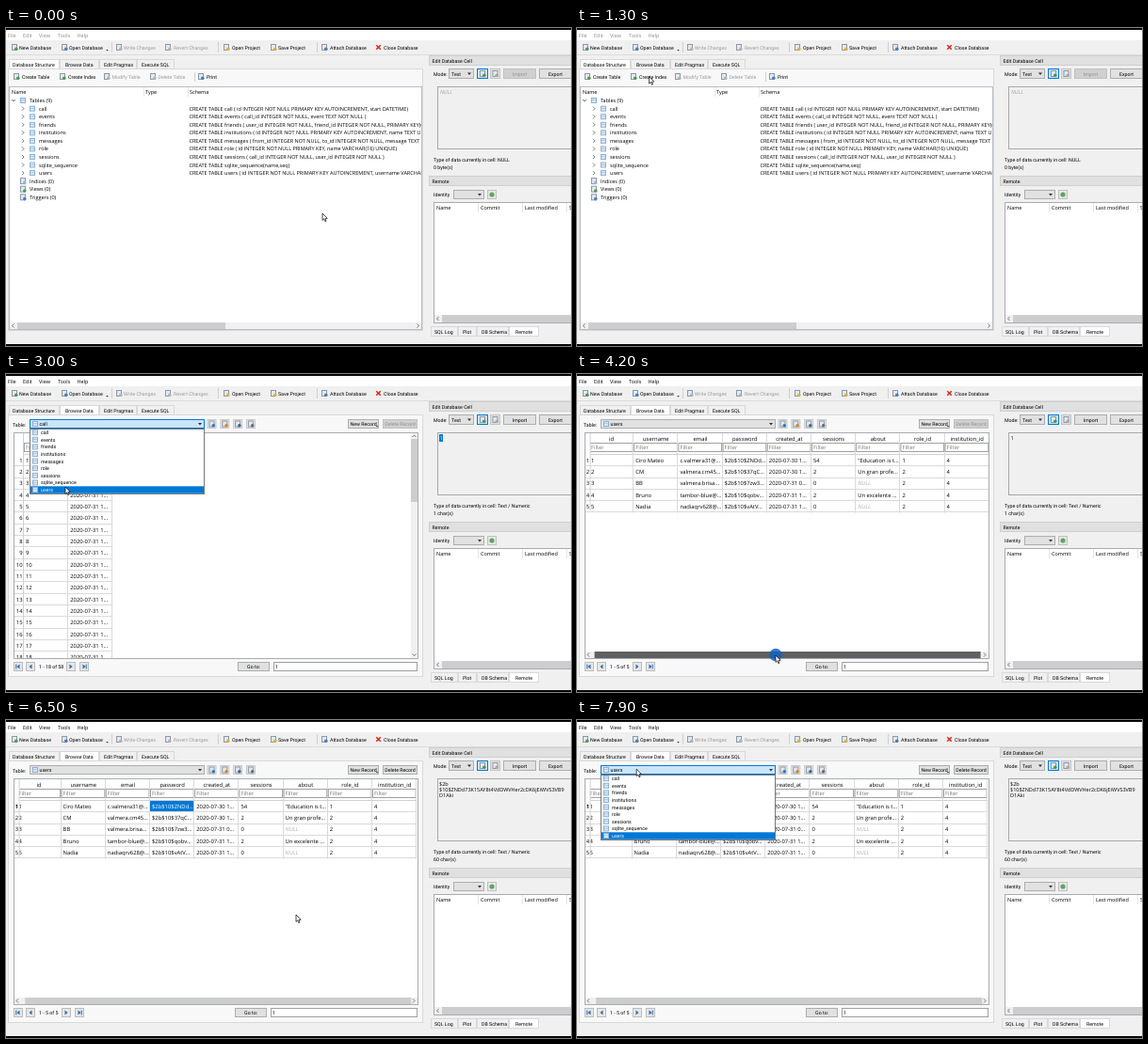
An HTML page with a canvas for the animation above (8000 ms loop, 600 by 338 pixels).

```html
<!DOCTYPE html>
<html lang="en">
<head>
<meta charset="utf-8">
<title>Database browser</title>
<style>
html, body { margin: 0; width: 100%; height: 100%; overflow: hidden; background: #000; }
canvas { display: block; width: 600px; height: 338px; }
</style>
</head>
<body>
<canvas></canvas>
<script>
const canvas = document.querySelector('canvas');
const ratio = window.devicePixelRatio || 1;
canvas.width = 600 * ratio;
canvas.height = 338 * ratio;
const ctx = canvas.getContext('2d');
const LOOP = 8000;
const UI = '5.25px Roboto, sans-serif';
const TREE = '5.5px "Open Sans", sans-serif';
const CELL = '5.85px "Open Sans", sans-serif';
const BLUE = '#0078d7', GRAY = '#9a9a9a', THUMB = '#cdcdcd';

// Moments of the session, in ms
const BROWSE = 1500, OPEN = 2400, USERS = 3300, DRAG = 4000, DROP = 4500, PICK = 5200, REOPEN = 7700;
const clicks = [BROWSE, OPEN, USERS, PICK, REOPEN];
const path = [
  [0, 336, 197], [100, 336, 197], [800, 68, 134], [1000, 69, 120], [1400, 78, 39], [1600, 78, 39],
  [2100, 73, 53], [2500, 72, 54], [3000, 63, 120], [3400, 63, 122], [3900, 209, 299], [4000, 209, 299],
  [4400, 213, 299], [4600, 213, 299], [5100, 180, 92], [5400, 180, 92], [6200, 308, 207],
  [6900, 308, 207], [7600, 64, 53], [8000, 63, 52]
];

const tables = ['call', 'events', 'friends', 'institutions', 'messages', 'role', 'sessions', 'sqlite_sequence', 'users'];
const ID = ' ( id INTEGER NOT NULL PRIMARY KEY';
const schemas = [
  ID + ' AUTOINCREMENT, start DATETIME)',
  ' ( call_id INTEGER NOT NULL, event TEXT NOT NULL )',
  ' ( user_id INTEGER NOT NULL, friend_id INTEGER NOT NULL, PRIMARY KEY(user_id, friend_id) )',
  ID + ' AUTOINCREMENT, name TEXT UNIQUE )',
  ' ( from_id INTEGER NOT NULL, to_id INTEGER NOT NULL, message TEXT )',
  ID + ', name VARCHAR(16) UNIQUE)',
  ' ( call_id INTEGER NOT NULL, user_id INTEGER NOT NULL )',
  '(name,seq)',
  ID + ' AUTOINCREMENT, username VARCHAR(32) )'
];
const callRows = Array.from({ length: 18 }, (_, i) => [i + 1, `2020-07-31 ${i ? 1 : 0}...`]);
const userColumns = ['id', 'username', 'email', 'password', 'created_at', 'sessions', 'about', 'role_id', 'institution_id'];
const userRows = [
  [1, 'Ciro Mateo', 'c.valmera31@...', '$2b$10$ZNDd...', '2020-07-30 1...', 54, '"Education is t...', 1, 4],
  [2, 'CM', 'valmera.cm45...', '$2b$10$37qC...', '2020-07-30 1...', 2, 'Un gran profe...', 2, 4],
  [3, 'BB', 'valmera.brisa...', '$2b$10$7zw3...', '2020-07-31 0...', 0, 'NULL', 2, 4],
  [4, 'Bruno', 'tambor-blue@...', '$2b$10$qobv...', '2020-07-31 1...', 2, 'Un excelente ...', 2, 4],
  [5, 'Nadia', 'nadiaqrv628@...', '$2b$10$vAtV...', '2020-07-31 1...', 0, 'NULL', 2, 4]
];
const hash = ['$2b', '$10$ZNDd73K15AY8t4VdDWVHer2cDK6jEiWVS3VB9', 'D1Aki'];

function rect(x, y, w, h, color) {
  ctx.fillStyle = color;
  ctx.fillRect(x, y, w, h);
}

function box(x, y, w, h, fill, border = '#adadad') {
  rect(x, y, w, h, border);
  rect(x + 1, y + 1, w - 2, h - 2, fill);
}

function text(s, x, y, color = '#000', font = UI, align = 'left') {
  ctx.font = font;
  ctx.textAlign = align;
  ctx.fillStyle = color;
  ctx.fillText(s, x, y + 2);
}

function poly(x, y, points, fill, stroke, width = .8) {
  ctx.beginPath();
  points.forEach(([dx, dy]) => ctx.lineTo(x + dx, y + dy));
  if (fill) {
    ctx.closePath();
    ctx.fillStyle = fill;
    ctx.fill();
  }
  if (stroke) {
    ctx.strokeStyle = stroke;
    ctx.lineWidth = width;
    ctx.stroke();
  }
}

function disc(x, y, r, color) {
  ctx.beginPath();
  ctx.arc(x, y, r, 0, 7);
  ctx.fillStyle = color;
  ctx.fill();
}

function clip(x, y, w, h, draw) {
  ctx.save();
  ctx.beginPath();
  ctx.rect(x, y, w, h);
  ctx.clip();
  draw();
  ctx.restore();
}

// Chevron pointing right, turned by quarter turns
function chevron(x, y, turns = 0, color = '#555') {
  ctx.save();
  ctx.translate(x, y);
  ctx.rotate(turns * Math.PI / 2);
  poly(0, 0, [[-1, -2], [1, 0], [-1, 2]], null, color);
  ctx.restore();
}

function icon(x, y, accent, page = '#e4e9ef', border = '#8b98a6') {
  box(x - 3, y - 3.5, 6, 7, page, border);
  disc(x + 1.8, y + 1.8, 1.8, accent);
}

function tableIcon(x, y) {
  box(x - 3, y - 3, 6, 6, '#d9e9f8', '#8fb0d0');
  rect(x - 2, y - .5, 4, .6, '#8fb0d0');
}

function button(label, x, y, w, h, enabled = true) {
  box(x, y, w, h, enabled ? '#e1e1e1' : '#d0d0d0', enabled ? '#adadad' : '#c0c0c0');
  text(label, x + w / 2, y + h / 2, enabled ? '#000' : '#909090', UI, 'center');
}

function combo(x, y, w, h, label = '', hot = false) {
  box(x, y, w, h, hot ? '#cce4f7' : '#e1e1e1', hot ? BLUE : '#adadad');
  text(label, x + 3, y + h / 2);
  poly(x + w - 5, y + h / 2, [[-2, -1], [2, -1], [0, 1.5]], '#333');
}

function toolItem(label, iconX, textX, y, color, enabled = true) {
  icon(iconX, y, enabled ? color : '#b5b5b5');
  text(label, textX, y, enabled ? '#000' : GRAY);
}

function tabs(items, active, y, h) {
  items.forEach(([label, x, w, textX], i) => {
    box(x, y, w, h, i === active ? '#fff' : '#f0f0f0', '#d9d9d9');
    text(label, textX, y + h / 2);
  });
}

function frame(focused) {
  rect(0, 0, 600, 338, '#000');
  rect(0, 2, 600, 334, '#f0f0f0');
  rect(0, 2, 600, 11, '#fff');
  const menu = { File: 2, Edit: 18, View: 35, Tools: 55, Help: 75.5 };
  for (const name in menu) text(name, menu[name], 7.7, focused ? '#000' : '#8a8a8a', TREE);
  rect(0, 28, 600, 1, '#dcdcdc');
  toolItem('New Database', 9, 14, 20.5, '#4a9a50');
  toolItem('Open Database', 62, 67, 20.5, '#4a7fb8');
  poly(107.5, 23.5, [[-1.3, -.5], [1.3, -.5], [0, 1]], '#333');
  toolItem('Write Changes', 120, 125, 20.5, '', false);
  toolItem('Revert Changes', 172, 178, 20.5, '', false);
  toolItem('Open Project', 234, 240, 20.5, '#e2b13c');
  toolItem('Save Project', 284, 289, 20.5, '#e2b13c');
  toolItem('Attach Database', 338, 344, 20.5, '#4a7fb8');
  for (const x of [112, 225, 330]) rect(x, 15, 1, 11, '#cfcfcf');
  poly(395.5, 20.5, [[-2.3, -2.3], [2.3, 2.3]], null, '#d92c20', 1.6);
  poly(395.5, 20.5, [[-2.3, 2.3], [2.3, -2.3]], null, '#d92c20', 1.6);
  text('Close Database', 401, 20.5);
}

function structurePane(mouse) {
  toolItem('Create Table', 11, 17, 51.5, '#4a9a50');
  toolItem('Create Index', 60, 66, 51.5, '#4a9a50');
  toolItem('Modify Table', 107, 112.5, 51.5, '', false);
  toolItem('Delete Table', 156, 161.5, 51.5, '', false);
  rect(200, 47, 1, 10, '#d0d0d0');
  toolItem('Print', 207, 213, 51.5, '#4a7fb8');
  box(3, 62, 439, 259, '#fff', '#b8bcc2');
  text('Name', 6, 68, '#000', TREE);
  text('Type', 148, 68, '#000', TREE);
  text('Schema', 195, 68, '#000', TREE);
  rect(146, 63, 1, 10, '#e5e5e5');
  rect(193, 63, 1, 10, '#e5e5e5');
  const hover = Math.floor((mouse.y - 83.5) / 8.55);
  clip(4, 63, 437, 250, () => {
    chevron(8, 77, 1);
    tableIcon(18, 77);
    text('Tables (9)', 25, 77, '#000', TREE);
    tables.forEach((name, i) => {
      const y = 85.7 + i * 8.55;
      if (i === hover) rect(4, y - 4.2, 437, 8.5, '#e5f3ff');
      chevron(18, y);
      tableIcon(28, y);
      text(name, 35, y, '#000', TREE);
      text('CREATE TABLE ' + name + schemas[i], 194.5, y, '#000', TREE);
    });
    ['Indices', 'Views', 'Triggers'].forEach((name, i) => {
      const y = 162.6 + i * 8.6;
      icon(18, y, ['#9ab4cc', '#4a9a50', '#4a7fb8'][i]);
      text(name + ' (0)', 25, y, '#000', TREE);
    });
  });
  rect(4, 313, 437, 7, '#f0f0f0');
  rect(12, 313, 221, 7, THUMB);
  chevron(7.5, 316.5, 2);
  chevron(437.5, 316.5);
}

function grid(columns, rows, left, offset, picked, right) {
  const width = 47.2, pitch = 12.32, bottom = columns.length > 2 ? 294 : 302;
  const ruleEnd = Math.min(right, left + columns.length * width - offset);
  clip(9, 63, right - 9, bottom - 63, () => {
    rows.forEach((row, i) => {
      const y = 91.7 + i * pitch, bold = picked && i === 0 ? 'bold ' : '';
      text(i + 1, left - 1.5, y, '#000', bold + CELL, 'right');
      rect(9, Math.round(y + 5.5), ruleEnd - 9, 1, '#dadada');
    });
    rect(left - 1, 63, 1, 21 + rows.length * pitch, '#d0d0d0');
  });
  clip(left, 63, right - left, bottom - 63, () => {
    columns.forEach((name, c) => {
      const x = left + c * width - offset;
      text(name, x + width / 2, 69, '#000', CELL, 'center');
      box(x, 73, width - .5, 10, '#fff', '#a0a0a0');
      text('Filter', x + 2, 78, '#777', CELL);
      rect(Math.round(x + width) - 1, 63, 1, 23 + rows.length * pitch, '#dadada');
      rows.forEach((row, i) => {
        const y = 91.7 + i * pitch, chosen = picked && i === 0 && c === 3;
        const empty = row[c] === 'NULL';
        if (chosen) rect(x, 86, width - 1, 11, BLUE);
        text(row[c], x + 2, y, chosen ? '#fff' : empty ? '#b0b0b0' : '#000', (empty ? 'italic ' : '') + CELL);
      });
    });
    rect(left, 85, ruleEnd - left, 1, '#d0d0d0');
  });
}

function navButton(x, back, edge) {
  box(x - 5, 306, 10, 10, '#e6e6e6', '#bcbcbc');
  const d = back ? -1 : 1;
  poly(x, 311, [[-1.5 * d, -2.5], [1.5 * d, 0], [-1.5 * d, 2.5]], '#2c6cb0');
  if (edge) rect(x + 2.2 * d - .5, 308.5, 1, 5, '#2c6cb0');
}

function browsePane(t, mouse, open) {
  const users = t >= USERS, picked = t >= PICK;
  const hot = open || (mouse.y > 47 && mouse.y < 59 && mouse.x > 25 && mouse.x < 211);
  text('Table:', 7, 53.5);
  combo(25, 48, 186, 10, '', hot);
  tableIcon(31, 53);
  text(users ? 'users' : 'call', 35.5, 53.2);
  ['#2c7cc0', '#d9822b', '#38699a', '#607080'].forEach((color, i) => {
    box(213.5 + i * 13.8, 48, 10, 10, '#e8e8e8', '#c8c8c8');
    icon(218.5 + i * 13.8, 53, color);
  });
  button('New Record', 363, 48, 33, 10);
  poly(394, 55.5, [[-1.2, -.5], [1.2, -.5], [0, 1]], '#333');
  button('Delete Record', 400, 48, 37, 10, picked);

  box(8, 62, 430, 241, '#fff', '#a8acb2');
  if (users) {
    const offset = Math.min(1, Math.max(0, (t - DRAG) / 400)) * 3.2;
    grid(userColumns, userRows, 14.6, offset, picked, 437);
    rect(9, 295, 428, 7, '#f0f0f0');
    rect(17 + offset, 295, 410, 7, t >= DRAG && t < DROP ? '#606060' : THUMB);
    chevron(12, 298.5, 2);
    chevron(433, 298.5);
  } else {
    grid(['id', 'start'], callRows, 19, 0, false, 430);
    rect(430, 63, 7, 239, '#f0f0f0');
    rect(430, 69, 7, 67, THUMB);
    chevron(433.5, 66, 3);
    chevron(433.5, 298.5, 1);
  }
  const shift = users ? 5 : 0, go = users ? 243 : 246;
  navButton(13, true, true);
  navButton(26, true, false);
  text(users ? '1 - 5 of 5' : '1 - 18 of 58', 35, 311);
  navButton(69 - shift, false, false);
  navButton(83 - shift, false, true);
  button('Go to:', go, 306, 34, 10);
  box(go + 38, 306, 399 - go, 10, '#fff', '#a0a0a0');
  text('1', go + 40, 311);

  if (open) {
    box(25, 58, 186, 70, '#fff', '#777');
    const row = mouse.y > 58 ? Math.min(8, Math.floor((mouse.y - 58) / 7.65)) : users ? 8 : 0;
    tables.forEach((name, i) => {
      const y = 62.2 + i * 7.6;
      if (i === row) rect(26, y - 3.7, 184, 7.5, BLUE);
      tableIcon(31, y);
      text(name, 37, y, i === row ? '#fff' : '#000');
    });
  }
}

function dockTitle(label, y) {
  box(449, y, 152, 11, '#e0e0e0', '#cfcfcf');
  text(label, 452.5, y + 5.5);
}

function docks(t) {
  const loaded = t >= BROWSE, picked = t >= PICK;
  dockTitle('Edit Database Cell', 29);
  text('Mode:', 454, 48.5);
  combo(470, 43, 27, 11, 'Text');
  box(500, 43, 12, 11, '#cce4f7', BLUE);
  icon(506, 48.5, '#4a9a50');
  box(514, 43, 11, 11, '#e1e1e1', '#c4c4c4');
  icon(519.5, 48.5, '#aaa');
  button('Import', 528, 43, 35, 11, loaded);
  button('Export', 566, 43, 35, 11);
  box(458, 62, 143, 67, '#f0f0f0', '#a8a8a8');
  if (picked) hash.forEach((line, i) => text(line, 460, 68 + i * 6, '#000', TREE));
  else if (loaded) {
    if (t < USERS) rect(460, 64, 4, 8, BLUE);
    text('1', 460.5, 68, t < USERS ? '#fff' : '#000', TREE);
  } else text('NULL', 461, 68, '#a0a0a0', 'italic ' + TREE);
  text('Type of data currently in cell: ' + (loaded ? 'Text / Numeric' : 'NULL'), 454, 139.5);
  text(picked ? '60 char(s)' : loaded ? '1 char(s)' : '0 byte(s)', 454, 148.3);

  dockTitle('Remote', 157);
  text('Identity', 454, 177);
  combo(475, 172, 33, 10);
  box(511, 172, 10, 10, '#e8e8e8', '#c0c0c0');
  disc(516, 177, 2.6, '#5fa463');
  box(454, 185, 147, 129, '#fff', '#a8acb2');
  text('Name', 457, 191, '#000', TREE);
  text('Commit', 504, 191, '#000', TREE);
  text('Last modified', 551, 191, '#000', TREE);
  text('Size', 598, 191, '#000', TREE);
  for (const x of [501, 548, 595]) rect(x, 186, 1, 10, '#e5e5e5');
  rect(455, 305, 145, 8, '#f0f0f0');
  rect(463, 305, 137, 8, THUMB);
  chevron(458.5, 309, 2);
  tabs([['SQL Log', 451, 29, 455], ['Plot', 480, 20, 485], ['DB Schema', 500, 34, 505], ['Remote', 534, 32, 541]], 3, 317, 11);
}

function mouseAt(t) {
  const i = path.findIndex(p => p[0] > t);
  const [t0, x0, y0] = path[i - 1], [t1, x1, y1] = path[i];
  const u = (t - t0) / (t1 - t0), k = u * u * (3 - 2 * u);
  return { x: x0 + (x1 - x0) * k, y: y0 + (y1 - y0) * k };
}

function draw(t) {
  const mouse = mouseAt(t), browsing = t >= BROWSE;
  const open = (t >= OPEN && t < USERS) || t >= REOPEN;
  ctx.setTransform(ratio, 0, 0, ratio, 0, 0);
  ctx.textRendering = 'geometricPrecision';
  frame(browsing);
  box(2, 43, 441, 279, '#f8f8f8', '#d9d9d9');
  tabs([['Database Structure', 3, 54, 7], ['Browse Data', 57, 42, 63], ['Edit Pragmas', 99, 40, 104], ['Execute SQL', 139, 40, 144]], browsing ? 1 : 0, 33, 11);
  if (browsing) browsePane(t, mouse, open);
  else structurePane(mouse);
  docks(t);

  const pressed = (t >= DRAG && t < DROP) || clicks.some(c => Math.abs(t - c) < 100);
  if (pressed) disc(mouse.x, mouse.y - .5, 6.7, 'rgba(16, 98, 190, .85)');
  poly(mouse.x, mouse.y, [[0, 0], [0, 7.4], [1.7, 5.9], [2.8, 8.6], [4, 8.1], [2.9, 5.5], [5.2, 5.3], [0, 0]], '#fff', '#000', .7);
}

function tick() {
  draw(Math.floor(performance.now() % LOOP / 100) * 100);
  requestAnimationFrame(tick);
}
tick();
</script>
</body>
</html>
```
